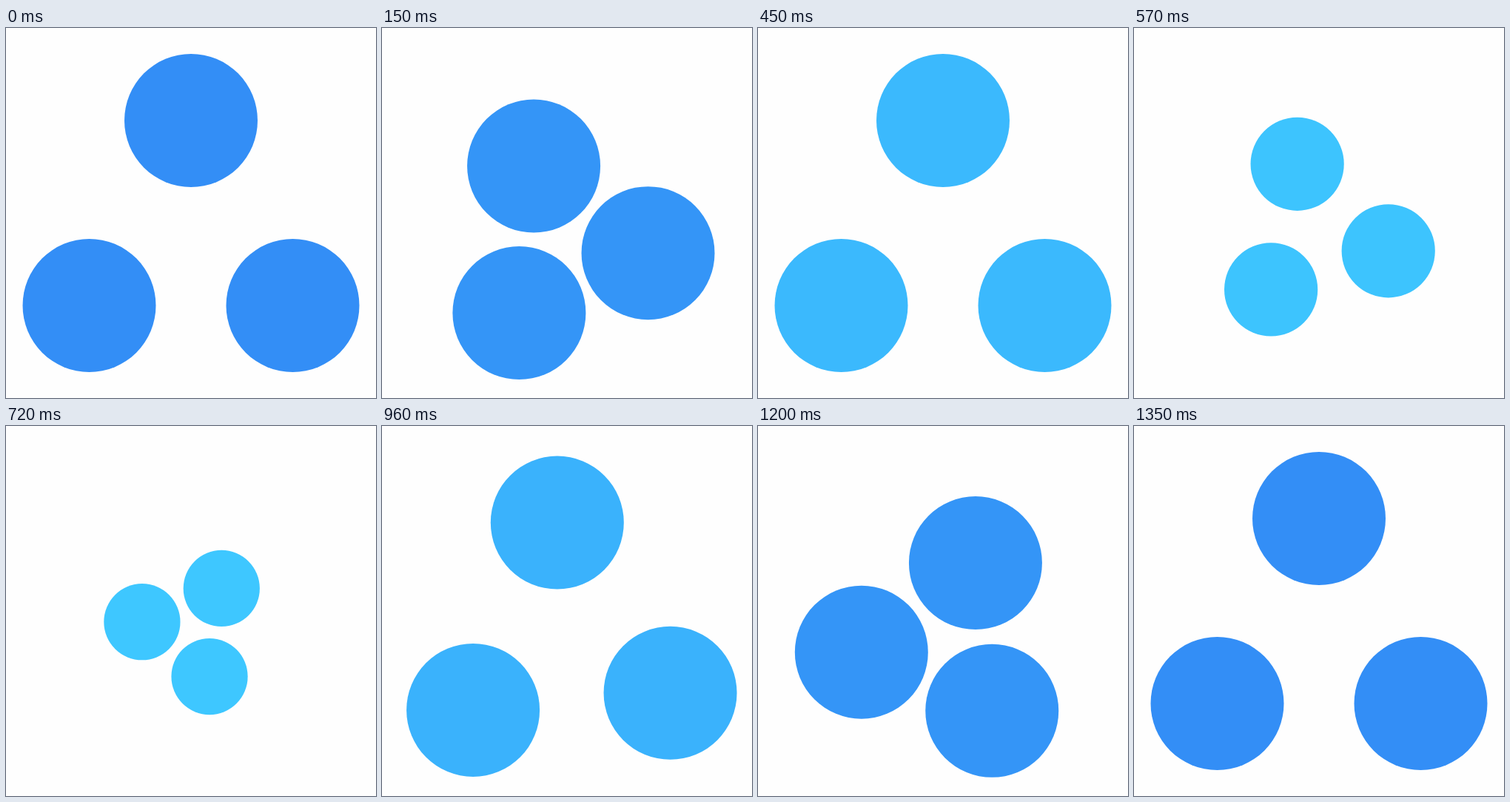
Write an HTML page that moves like this. It is 500 px wide and 500 px high and loops after 1.38 s.

```html
<!DOCTYPE html>
<html lang="en">
<head>
<meta charset="utf-8">
<title>Circling dots</title>
<style>
  html, body { margin: 0; width: 100%; height: 100%; overflow: hidden; background: #fefefe; }
  svg { display: block; width: 100%; height: 100%; }
</style>
</head>
<body>
<svg viewBox="0 0 500 500">
  <g id="dots"><circle r="90"/><circle r="90"/><circle r="90"/></g>
</svg>
<script>
const LOOP = 1380, END = 1350, TURN = 450, MIDDLE = 664;
const DARK = [51, 142, 246], LIGHT = [62, 200, 255], SMALLEST = 0.5;
const corners = [[250, 125], [112.5, 375], [387.5, 375]];

const group = document.getElementById('dots');
const circles = [...group.children];

const clamp = v => Math.min(1, Math.max(0, v));
const ease = v => v * v * (3 - 2 * v);
const mix = (a, b, k) => a + (b - a) * k;
const next = i => (i + 1) % 3;

// Each corner's tangent runs parallel to the line between its neighbours.
const tangents = corners.map((_, i) => {
  const from = corners[(i + 2) % 3], to = corners[next(i)];
  return [(to[0] - from[0]) / 6, (to[1] - from[1]) / 6];
});
const handle = (i, k) => corners[i].map((v, axis) => v + k * tangents[i][axis]);

// The first turn leaves its corner straight, the last one arrives straight.
function makePath(i, turn) {
  const path = document.createElementNS('http://www.w3.org/2000/svg', 'path');
  const out = handle(i, turn > 0 ? 1 : 0);
  const into = handle(next(i), turn < 2 ? -1 : 0);
  path.setAttribute('d', `M${corners[i]} C${out} ${into} ${corners[next(i)]}`);
  return { path, length: path.getTotalLength() };
}
const turns = [0, 1, 2].map(turn => corners.map((_, i) => makePath(i, turn)));

function draw(now) {
  const t = Math.min(now % LOOP, END);
  const turn = Math.min(2, Math.floor(t / TURN));
  const progress = ease(t / TURN - turn);

  circles.forEach((circle, i) => {
    const { path, length } = turns[turn][i];
    const { x, y } = path.getPointAtLength(progress * length);
    circle.setAttribute('cx', x);
    circle.setAttribute('cy', y);
  });

  const half = t < MIDDLE ? MIDDLE - TURN : 2 * TURN - MIDDLE;
  const scale = mix(SMALLEST, 1, ease(clamp(Math.abs(t - MIDDLE) / half)));
  group.setAttribute('transform', `translate(250 250) scale(${scale}) translate(-250 -250)`);

  const glow = ease(1 - Math.abs(2 * t / END - 1));
  group.setAttribute('fill', `rgb(${DARK.map((v, i) => Math.round(mix(v, LIGHT[i], glow)))})`);

  requestAnimationFrame(draw);
}
draw(performance.now());
</script>
</body>
</html>
```
